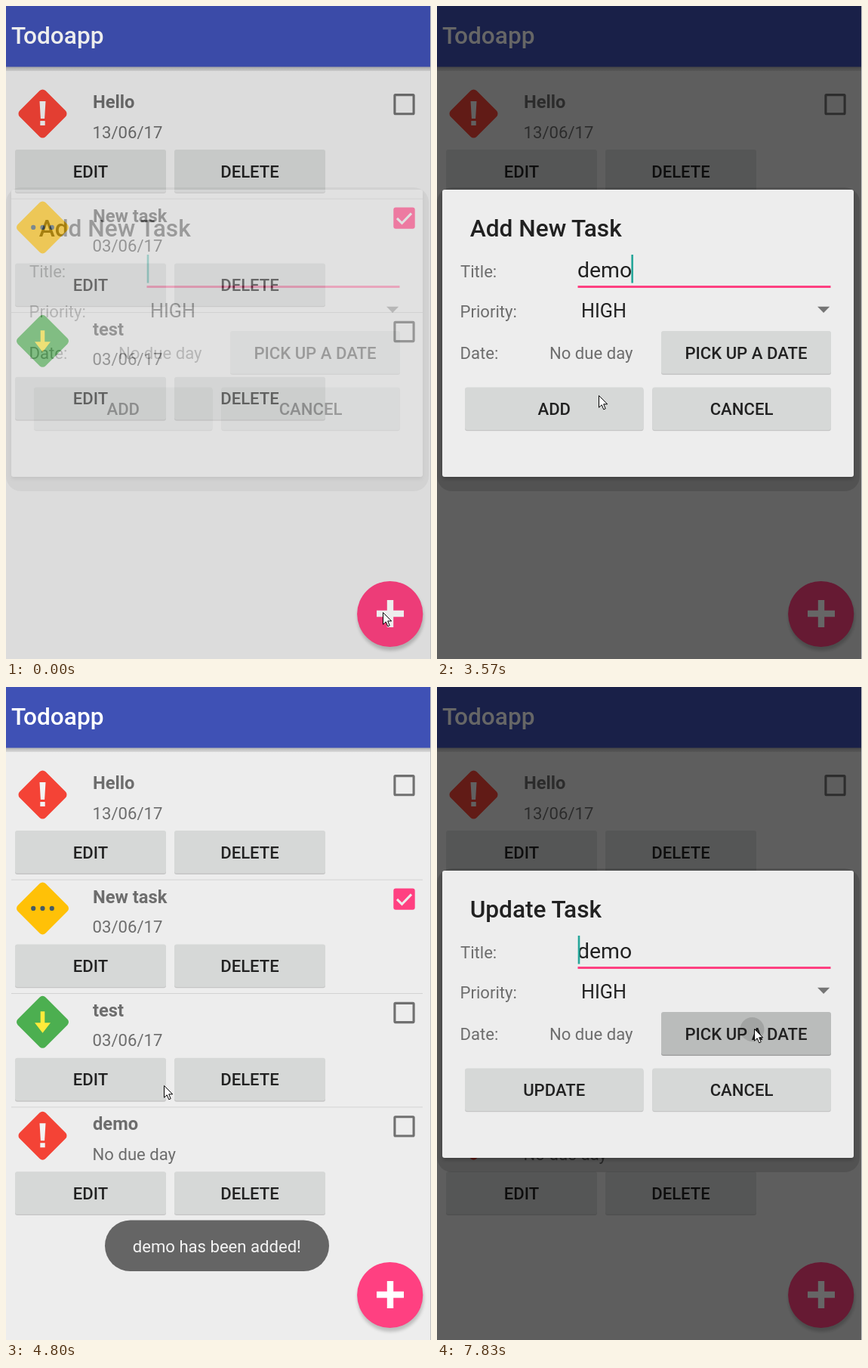
An HTML page that plays this animation: 563 px wide and 864 px high, repeating every 8000 ms.

```html
<!DOCTYPE html>
<html lang="en">
<head>
<meta charset="utf-8">
<title>Task list</title>
<style>
  html, body { margin: 0; width: 100%; height: 100%; overflow: hidden; background: #ededed; }
  svg { display: block; width: 563px; height: 864px; }
  text { font-family: Roboto, sans-serif; font-size: 22.1px; fill: #6d6d6d; white-space: pre; }
  .head { font-size: 31.6px; font-weight: 500; }
  .name { font-size: 23.7px; font-weight: 700; }
  .label { font-weight: 500; fill: #212121; text-anchor: middle; }
  .dark { fill: #212121; }
</style>
</head>
<body>
<svg id="stage" viewBox="0 0 563 864" xmlns="http://www.w3.org/2000/svg"></svg>
<script>
const LOOP = 8000;
const PITCH = 150.4;
const FACE = '#d6d8d7';
const PINK = '#ff4081';

const text = (x, y, s, cls = '', extra = '') => `<text x="${x}" y="${y}" class="${cls}" ${extra}>${s}</text>`;

const rect = (x, y, w, h, fill, rx = 0, extra = '') =>
  `<rect x="${x}" y="${y}" width="${w}" height="${h}" rx="${rx}" fill="${fill}" ${extra}/>`;

const button = (x, y, w, label, id = '') =>
  rect(x, y + 1.4, w, 56.5, '#000', 3, `opacity=".17" ${id && `id="${id}Shade"`}`) +
  rect(x, y, w, 56.5, FACE, 3, id && `id="${id}"`) +
  text(x + w / 2, y + 36.6, label, 'label', id && `id="${id}Label"`);

const diamond = (side, fill) =>
  rect(-side / 2, -side / 2, side, side, fill, 5.5, 'transform="rotate(45)"');

const icons = {
  high: diamond(48.5, '#f44336') +
    '<path d="M-4-16.5H4L2.6 6.5H-2.6ZM-3.2 9.5H3.2V15.5H-3.2Z" fill="#f3f3f3"/>',
  medium: diamond(52, '#ffc107') +
    [-12.3, 0, 12.3].map(x => `<circle cx="${x}" r="3.1" fill="#455a64"/>`).join(''),
  low: diamond(52, '#4caf50') +
    '<path d="M-2.8-14H2.8V1H10.5L0 14.5L-10.5 1H-2.8Z" fill="#ffeb3b"/>'
};

const checkbox = done => done
  ? rect(513.3, 116, 28.4, 28.4, PINK, 3) +
    '<path d="M518 130.5L524.5 137L537 124" fill="none" stroke="#ededed" stroke-width="3"/>'
  : rect(514.9, 117.6, 25.2, 25.2, 'none', 1, 'stroke="#707070" stroke-width="3.1"');

const tasks = [
  ['Hello', '13/06/17', 'high'],
  ['New task', '03/06/17', 'medium', true],
  ['test', '03/06/17', 'low'],
  ['demo', 'No due day', 'high']
];

const row = ([name, date, level, done], i) => `
  <g id="row${i}" transform="translate(0 ${i * PITCH})">
    ${i ? rect(7, 104.2, 545, 1, '#d2d2d2') : ''}
    <g class="icon" transform="translate(48.5 142.5)">${icons[level]}</g>
    ${text(115, 135.3, name, 'name')}${text(114.6, 174.7, date)}
    ${checkbox(done)}
    ${button(12, 190, 200, 'EDIT', 'edit' + i)}${button(223, 190, 200, 'DELETE')}
  </g>`;

const stage = document.getElementById('stage');
stage.innerHTML = `
  <defs>
    <linearGradient id="fade" x2="0" y2="1">
      <stop stop-color="#000" stop-opacity=".26"/><stop offset="1" stop-color="#000" stop-opacity=".08"/>
    </linearGradient>
    <filter id="soft" x="-20%" y="-20%" width="140%" height="140%"><feGaussianBlur stdDeviation="2.2"/></filter>
  </defs>
  ${rect(0, 0, 563, 864, '#ededed')}
  ${rect(0, 80, 563, 6, 'url(#fade)')}
  ${rect(0, 0, 563, 80.5, '#3f51b5')}
  ${text(7, 50, 'Todoapp', 'head', 'style="fill:#fff"')}
  ${tasks.map(row).join('')}
  <circle cx="509.5" cy="809" r="44" opacity=".2" filter="url(#soft)"/>
  <circle cx="508.7" cy="804.5" r="43.6" fill="${PINK}"/>
  <path d="M491 804H527M509 786V822" stroke="#fff" stroke-width="8.4"/>
  <g id="toast">
    ${rect(131, 705.5, 297, 67.5, '#656565', 33.7)}
    ${text(279.3, 748.3, 'demo has been added!', '', 'text-anchor="middle" style="fill:#f4f4f4"')}
  </g>
  <rect id="scrim" width="563" height="864"/>
  <g id="dialog">
    ${rect(0, 240, 560, 402, '#000', 20, 'opacity=".13"')}
    ${rect(7, 246, 545, 380, '#000', 4, 'opacity=".2" filter="url(#soft)"')}
    ${rect(7, 243, 545, 380, '#ededed', 3)}
    ${text(43.7, 304.7, '', 'head dark', 'id="heading"')}
    ${text(31, 359.3, 'Title:')}${text(30.5, 411.6, 'Priority:')}${text(30.5, 466.8, 'Date:')}
    ${text(186, 359.2, '', 'dark', 'id="entry" style="font-size:28.4px"')}
    ${rect(186.5, 370, 335, 3, PINK)}
    ${rect(0, 329, 2.6, 37.5, '#26a69a', 0, 'id="caret"')}
    ${text(191, 412, 'HIGH', 'dark', 'style="font-size:25.2px"')}
    <path d="M504 397.8H520.2L512.1 406Z" fill="#757575"/>
    ${text(149, 466.8, 'No due day')}
    ${button(297, 430, 225, 'PICK UP A DATE', 'pick')}
    <circle id="ripple" cx="417.5" cy="453" r="16" opacity=".13"/>
    ${button(37, 504.4, 236.5, '', 'confirm')}${button(285.3, 504.4, 236.5, 'CANCEL')}
  </g>
  ${rect(562, 0, 1, 864, '#c2c2c2')}
  <path id="pointer" d="M.5.5V16.2L4.2 12.8L6.8 18.8L9.2 17.7L6.7 11.8H11.7Z"
    fill="#fff" stroke="#000" stroke-width="1" stroke-linejoin="round"/>`;

const $ = id => document.getElementById(id);
const show = (node, on) => node.setAttribute('visibility', on ? 'inherit' : 'hidden');
const within = (t, spans) => spans.some(([a, b]) => t >= a && t < b);

// Latest entry whose time has passed: [time, ...values]
const held = (steps, t) => steps.filter(s => s[0] <= t).pop();

const pointerPath = [
  [0, 499, 802], [550, 489, 768], [690, 452, 645], [820, 405, 485], [950, 370, 372], [1090, 360, 340],
  [2730, 345, 362], [2870, 296, 428], [3000, 232, 510], [3130, 195, 546], [3270, 205, 533],
  [3570, 214, 515], [3830, 209, 527],
  [5360, 235, 540], [5490, 300, 572], [5620, 349, 612], [5760, 325, 652], [5890, 235, 680], [6020, 170, 688],
  [7000, 187, 680], [7130, 250, 640], [7270, 335, 565], [7400, 395, 485], [7540, 420, 452]
];
// time, scrim opacity, dialog opacity
const dialogFade = [
  [0, .07, .35], [120, .6, 1], [4240, .343, .1], [4370, .14, 0], [4500, 0, 0], [6590, .07, .35], [6720, .6, 1]
];
const toastFade = [[0, 0], [4640, .5], [4800, 1], [6440, .6], [6590, .15], [6720, 0]];
const caretOn = [[0, 120], [690, 1090], [1650, 2730], [3270, 3830], [6590, 7130], [7540, LOOP]];
const typing = [[0, 0], [1930, 1], [2060, 2], [2190, 3], [2320, 4]];

function press(id, on, color) {
  $(id).setAttribute('fill', on ? color : FACE);
  $(id + 'Shade').setAttribute('opacity', on ? .32 : .17);
}

function draw(t) {
  const [, scrim, dialog] = held(dialogFade, t);
  const [, x, y] = held(pointerPath, t);
  const updating = t >= 5000;

  $('scrim').setAttribute('opacity', scrim);
  $('dialog').setAttribute('opacity', dialog);
  $('toast').setAttribute('opacity', held(toastFade, t)[1]);
  $('pointer').setAttribute('transform', `translate(${x} ${y})`);

  show($('row3'), t >= 4240);
  const loading = within(t, [[4240, 4500]]);
  stage.querySelectorAll('.icon').forEach(icon => show(icon, !loading));

  $('heading').textContent = updating ? 'Update Task' : 'Add New Task';
  $('confirmLabel').textContent = updating ? 'UPDATE' : 'ADD';
  const entry = $('entry');
  entry.textContent = 'demo'.slice(0, held(typing, t)[1]);
  const typed = !updating && entry.textContent ? entry.getComputedTextLength() : 0;
  $('caret').setAttribute('x', 186.7 + Math.max(0, typed - 1.5));
  show($('caret'), within(t, caretOn));

  press('confirm', within(t, [[3970, 4500]]), '#c0c2c1');
  press('edit3', within(t, [[6290, 6720]]), '#c9cbca');
  press('pick', t >= 7830, '#babcbb');
  show($('ripple'), t >= 7830);
}

const start = performance.now();
function tick() {
  draw((performance.now() - start) % LOOP);
  requestAnimationFrame(tick);
}
tick();
</script>
</body>
</html>
```
